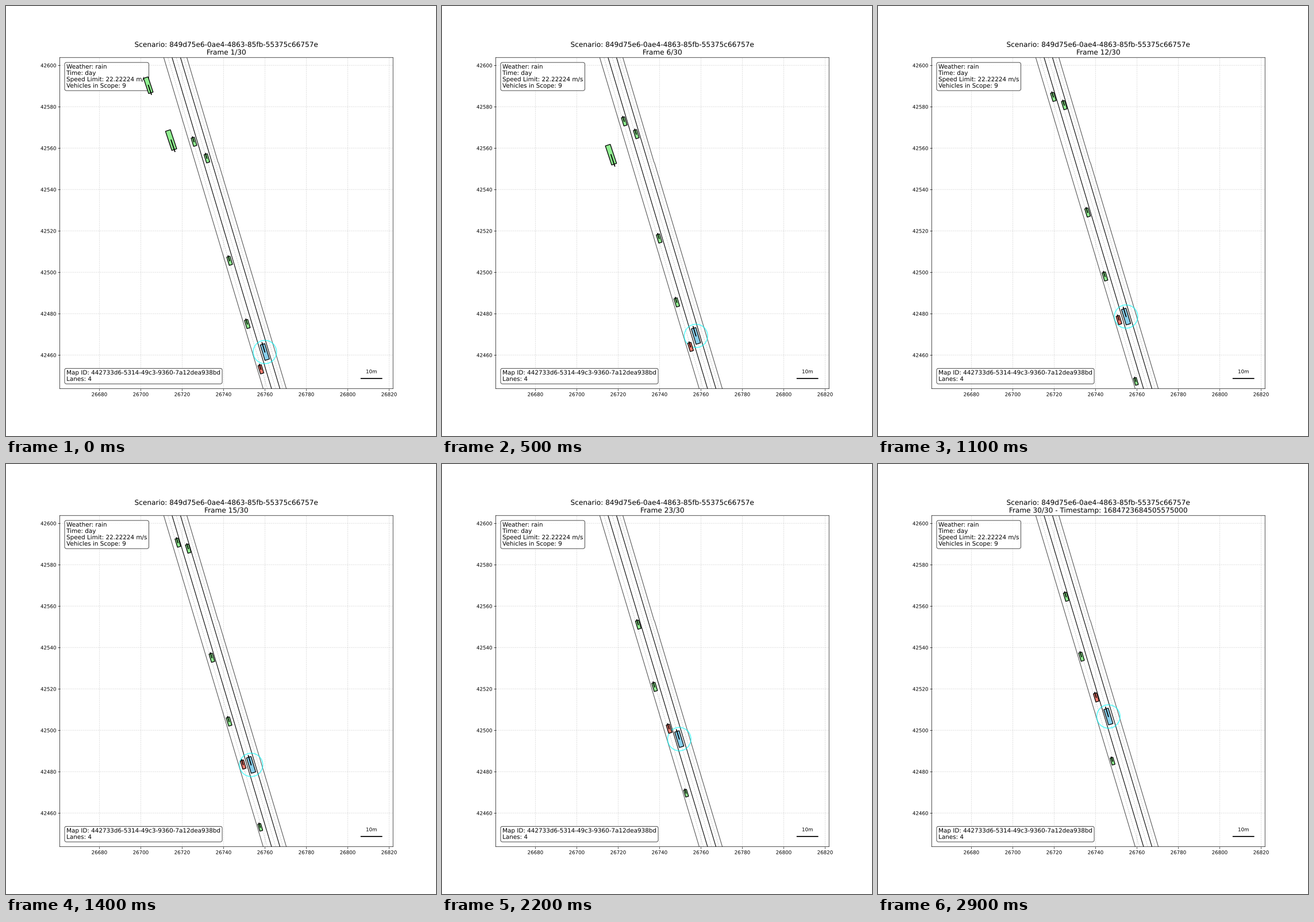
A matplotlib script that plays this animation: 748x748 px, repeating every 3 s.

```python
import numpy as np
import matplotlib.pyplot as plt
from matplotlib.animation import FuncAnimation
from matplotlib.patches import Circle, Polygon
from matplotlib.patheffects import Normal

SIZE, INCHES = 748, 12
FRAMES, INTERVAL = 30, 100
SCALE = 3.6                          # pixels per metre
LEFT, BOTTOM = 26660.87, 42443.73    # map corner of the axes
FORWARD, ONCOMING = 106.9, -71.7     # headings in degrees
GREEN, RED, BLUE = "lightgreen", "salmon", "skyblue"
CAR, VAN, TRUCK = (15, 5.9), (28, 8.2), (35, 9)

# Outlined text and no snapping keep sub-pixel positions
plt.rcParams.update({"font.family": "DejaVu Sans", "text.hinting": "none",
                     "path.snap": False, "path.effects": [Normal()]})


def to_map(x, y):
    """Stage pixels (y down) to map metres."""
    return np.array([LEFT + (x - 0.125 * SIZE) / SCALE,
                     BOTTOM + (0.89 * SIZE - y) / SCALE])


class Vehicle:
    """Box driving from start to end over frames t0..t1; slow > 0 brakes."""

    def __init__(self, ax, color, size, start, end, t0=0, t1=FRAMES - 1,
                 slow=0, shown=(0, FRAMES), heading=FORWARD):
        self.start, self.end = to_map(*start), to_map(*end)
        self.t0, self.t1, self.slow, self.shown = t0, t1, slow, shown
        a = np.radians(heading)
        length, width = np.array(size) / SCALE
        ahead = length * np.array([np.cos(a), np.sin(a)])
        side = width * np.array([-np.sin(a), np.cos(a)])
        self.corners = np.array([ahead + side, ahead - side,
                                 -ahead - side, -ahead + side]) / 2
        self.nose = 0.6 * ahead
        self.body = ax.add_patch(Polygon(self.corners, closed=True, fc=color,
                                         ec="black", lw=1.5, zorder=5))
        self.arrow, = ax.plot([], [], color="black", lw=2, zorder=6)

    def update(self, i):
        u = (i - self.t0) / (self.t1 - self.t0)
        u += self.slow * u * (1 - u)
        pos = self.start + u * (self.end - self.start)
        visible = self.shown[0] <= i < self.shown[1]
        self.body.set_visible(visible)
        self.arrow.set_visible(visible)
        self.body.set_xy(self.corners + pos)
        self.arrow.set_data(*np.column_stack((pos, pos + self.nose)))
        return pos


def draw_road(ax):
    def line(points, **style):
        ax.plot(*to_map(*np.transpose(points)), **style)

    top = [274.5, 289, 303.6, 314.7]
    shift = 173                      # sideways run from top to bottom
    borders = [[(x, 90), (x + shift, 666)] for x in top]
    borders[-1][1:1] = [(368.6, 271), (370, 274)]    # joint in the kerb
    for a, b in zip(borders, borders[1:]):
        # Neighbouring lanes share a border, so it is drawn twice
        for edge in (a, b):
            line(edge, color="black", lw=1.2, alpha=0.7)
        x = (a[0][0] + b[0][0]) / 2
        line([(x, 90), (x + shift, 666)], color="gray", ls="--", lw=0.8,
             alpha=0.5)


def panel(ax, y, va, text):
    ax.text(0.02, y, text, transform=ax.transAxes, fontsize=12, va=va,
            linespacing=1.18,
            bbox=dict(boxstyle="round", facecolor="white", alpha=0.8))


fig, ax = plt.subplots(figsize=(INCHES, INCHES), dpi=SIZE / INCHES)
ax.set_xlim(LEFT, LEFT + 0.775 * SIZE / SCALE)
ax.set_ylim(BOTTOM, BOTTOM + 0.77 * SIZE / SCALE)
ax.set_autoscale_on(False)
ax.set_xticks(range(26680, 26821, 20))
ax.set_yticks(range(42460, 42601, 20))
ax.ticklabel_format(useOffset=False, style="plain")
ax.grid(True, linestyle="--", alpha=0.5)

draw_road(ax)
panel(ax, 0.98, "top", "Weather: rain\nTime: day\n"
      "Speed Limit: 22.22224 m/s\nVehicles in Scope: 9")
panel(ax, 0.02, "bottom",
      "Map ID: 442733d6-5314-49c3-9360-7a12dea938bd\nLanes: 4")

bar_x, bar_y = to_map(617.7, 647.9)
ax.plot([bar_x, bar_x + 10], [bar_y, bar_y], color="black", lw=2)
ax.text(bar_x + 5, bar_y + 2, "10m", fontsize=10, ha="center", va="bottom")

ego = Vehicle(ax, BLUE, VAN, (450.3, 601.9), (400.8, 439.3))
others = [
    Vehicle(ax, RED, CAR, (443.4, 632), (379.6, 406)),
    Vehicle(ax, GREEN, CAR, (327, 236.2), (291, 108.5), t1=18,
            shown=(0, 22)),
    Vehicle(ax, GREEN, CAR, (349.5, 265), (307.8, 113.6), t1=18,
            shown=(0, 22)),
    Vehicle(ax, GREEN, CAR, (389, 443.2), (327.3, 231), slow=0.07),
    Vehicle(ax, GREEN, CAR, (419.8, 553.2), (354, 335.2)),
    Vehicle(ax, GREEN, (12.6, 5.2), (442.3, 632), (408, 517), t0=14,
            slow=-0.07, shown=(9, FRAMES)),
    Vehicle(ax, GREEN, TRUCK, (287.2, 233.2), (296.3, 267.5), t1=8,
            slow=0.49, shown=(0, 11), heading=ONCOMING),
    Vehicle(ax, GREEN, VAN, (247.6, 137.8), (249.2, 143.3), t1=1,
            shown=(0, 2), heading=ONCOMING),
]
halo = ax.add_patch(Circle((0, 0), 20.3 / SCALE, fill=False, ec="cyan",
                           lw=2, alpha=0.6, zorder=4))
title = ax.set_title("", fontsize=14)


def draw(i):
    for vehicle in others:
        vehicle.update(i)
    halo.center = ego.update(i)
    stamp = " - Timestamp: 1684723684505575000" if i == FRAMES - 1 else ""
    title.set_text("Scenario: 849d75e6-0ae4-4863-85fb-55375c66757e\n"
                   f"Frame {i + 1}/{FRAMES}{stamp}")
    return []


anim = FuncAnimation(fig, draw, frames=FRAMES, interval=INTERVAL,
                     repeat=True, repeat_delay=0, blit=False)
plt.show()
```
